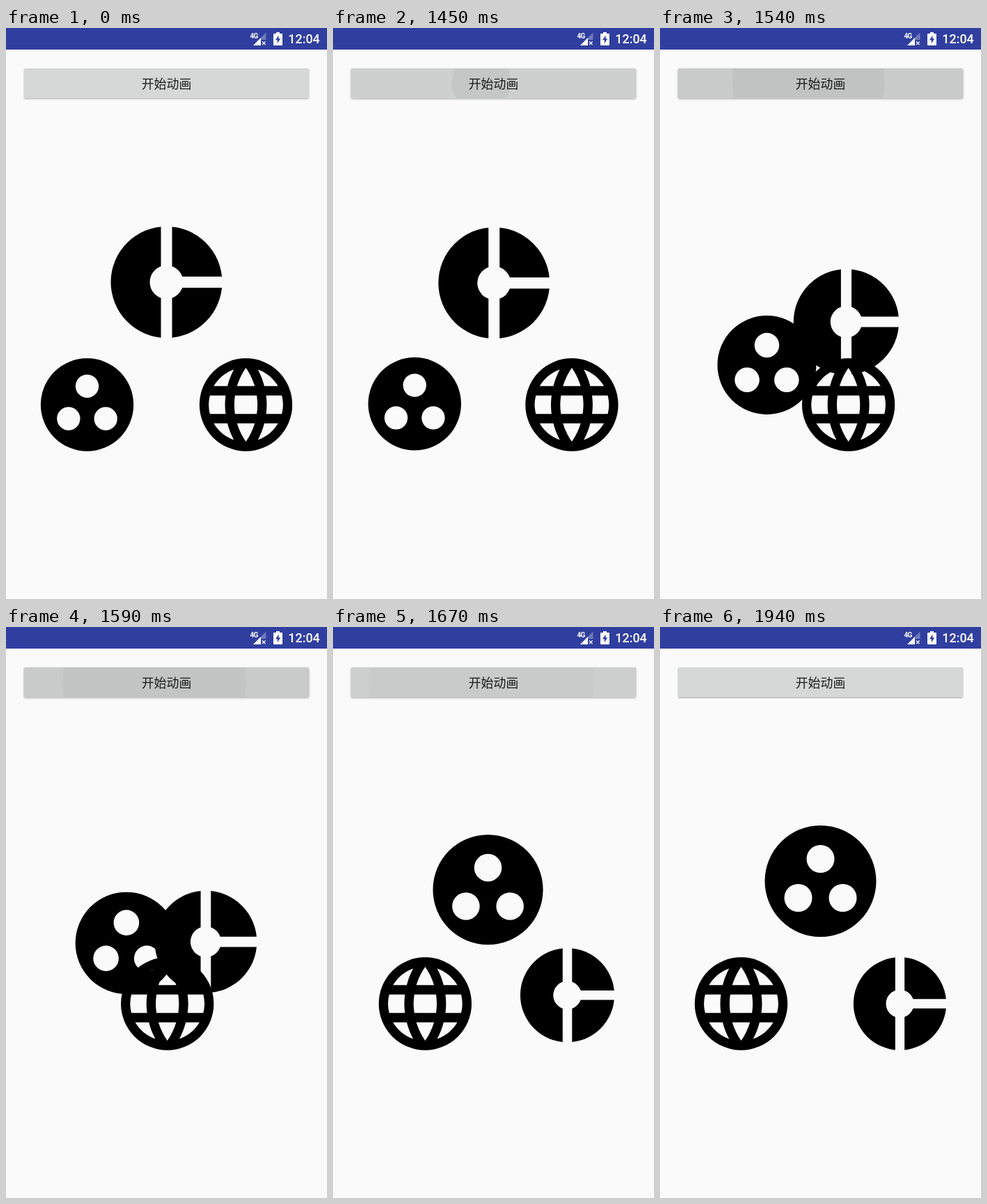
An HTML page that plays this animation: 461 by 820 pixels, repeating every 4.9 s.

```html
<!DOCTYPE html>
<html lang="zh">
<head>
<meta charset="utf-8">
<title>开始动画</title>
<style>
  html, body { margin: 0; width: 100%; height: 100%; overflow: hidden; background: #fafafa; }
  svg { position: absolute; left: 0; top: 0; width: 100%; height: 100%; }
  #shadow { position: absolute; left: 25.6px; top: 58px; width: 409.8px; height: 43px; border-radius: 2.6px; }
  .clock { font: 500 17.9px Roboto, sans-serif; }
  .network { font: 700 10px Roboto, sans-serif; letter-spacing: -.7px; }
  .label { font: 400 17.9px "Noto Sans CJK SC", "Noto Sans CJK", sans-serif; }
</style>
</head>
<body>
<div id="shadow"></div>
<svg viewBox="0 0 461 820">
  <defs>
    <clipPath id="buttonClip"><rect x="25.6" y="58" width="409.8" height="43" rx="2.6"/></clipPath>
    <path id="corner" d="M6.92-4H3.97C3.65-5.25 3.19-6.45 2.59-7.56 4.43-6.93 5.96-5.65 6.92-4Z"/>
    <path id="cap" d="M0-7.96C.83-6.76 1.48-5.43 1.91-4H-1.91C-1.48-5.43-.83-6.76 0-7.96Z"/>
    <g id="side">
      <use href="#corner"/>
      <use href="#corner" transform="scale(1 -1)"/>
      <path d="M4.36 2C4.44 1.34 4.5.68 4.5 0S4.44-1.34 4.36-2H7.74C7.9-1.36 8-.69 8 0S7.9 1.36 7.74 2Z"/>
    </g>
    <mask id="globeMask" maskUnits="userSpaceOnUse" x="-11" y="-11" width="22" height="22">
      <rect x="-11" y="-11" width="22" height="22" fill="#fff"/>
      <use href="#side"/>
      <use href="#side" transform="scale(-1 1)"/>
      <use href="#cap"/>
      <use href="#cap" transform="scale(1 -1)"/>
      <path d="M2.34 2H-2.34C-2.43 1.34-2.5.68-2.5 0S-2.43-1.35-2.34-2H2.34C2.43-1.35 2.5-.68 2.5 0S2.43 1.34 2.34 2Z"/>
    </mask>
    <mask id="dotsMask" maskUnits="userSpaceOnUse" x="-11" y="-11" width="22" height="22">
      <rect x="-11" y="-11" width="22" height="22" fill="#fff"/>
      <circle cy="-4" r="2.5"/>
      <circle cx="-4" cy="3" r="2.5"/>
      <circle cx="4" cy="3" r="2.5"/>
    </mask>
    <mask id="donutMask" maskUnits="userSpaceOnUse" x="-11" y="-11" width="22" height="22">
      <rect x="-11" y="-11" width="22" height="22" fill="#fff"/>
      <circle r="3"/>
      <path d="M-1-11H1V-1H11V1H1V11H-1Z"/>
    </mask>
  </defs>

  <!-- status bar -->
  <rect width="461" height="31" fill="#303f9f"/>
  <g fill="#fff">
    <text class="network" x="350.5" y="15">4G</text>
    <path d="M355 25L366 14V25Z"/>
    <path d="M366 14L373.5 6.5V17H366Z" opacity=".3"/>
    <path d="M368 19.5l4.6 4.6m0-4.6l-4.6 4.6" stroke="#fff" stroke-width="1.3"/>
    <path d="M388 6h5v2h3q1 0 1 1v15q0 1-1 1h-11q-1 0-1-1v-15q0-1 1-1h3z"/>
    <path d="M391.5 10.5L387 17.3h2.8v5l4.4-7h-2.7z" fill="#303f9f"/>
    <text class="clock" x="405.3" y="22.4">12:04</text>
  </g>

  <!-- button -->
  <g clip-path="url(#buttonClip)">
    <rect x="25" y="57" width="411" height="45" fill="#d6d7d7"/>
    <rect id="press" x="25" y="57" width="411" height="45"/>
    <circle id="ripple" cx="213" cy="78"/>
  </g>
  <text class="label" x="230.5" y="87.2" text-anchor="middle" fill-opacity=".87">开始动画</text>

  <!-- icons, drawn around 0,0 with radius 10 -->
  <g id="donut"><circle r="10" mask="url(#donutMask)"/></g>
  <g id="dots"><circle r="10" mask="url(#dotsMask)"/></g>
  <g id="globe"><circle r="10" mask="url(#globeMask)"/></g>
</svg>
<script>
  const LOOP = 4900;
  const PRESS = 1330, RIPPLE = 1405, MOVE = 1424, RELEASED = 1890;
  const MOVE_TIME = 300;
  const RECORD_STEP = 45;
  const SCREEN_STEP = 1000 / 60; // the icons move on the phone's refresh ticks

  const byId = id => document.getElementById(id);
  const [donut, dots, globe, press, ripple, shadow] =
    ['donut', 'dots', 'globe', 'press', 'ripple', 'shadow'].map(byId);

  const upper = { x: 230.5, y: 365, scale: 8 };
  const left = { x: 116.5, y: 541, scale: 20 / 3 };
  const right = { x: 344.5, y: 541, scale: 20 / 3 };

  const clamp = v => Math.min(1, Math.max(0, v));
  const mix = (a, b, k) => a + (b - a) * k;
  const ease = u => (1 - Math.cos(Math.PI * u)) / 2;

  function place(icon, from, to, k) {
    const [x, y, scale] = ['x', 'y', 'scale'].map(key => mix(from[key], to[key], k));
    icon.setAttribute('transform', `translate(${x} ${y}) scale(${scale})`);
  }

  function render(time) {
    const t = PRESS + Math.floor((time - PRESS + 20) / RECORD_STEP) * RECORD_STEP - 20;

    const moved = Math.round((t - MOVE) / SCREEN_STEP) * SCREEN_STEP - 1;
    const k = ease(clamp(moved / MOVE_TIME));
    place(donut, upper, right, k);
    place(globe, right, left, k);
    place(dots, left, upper, k);

    const spread = 1 - Math.exp(-Math.max(0, t - RIPPLE) / 172);
    ripple.setAttribute('r', 206 * spread);
    ripple.setAttribute('fill-opacity', .045 * clamp((1790 - t) / 300));

    const held = clamp(Math.min((t - PRESS) / 180, (RELEASED - t) / 310));
    press.setAttribute('fill-opacity', .063 * held);

    const lift = clamp(Math.min((time - PRESS) / 20 + .5, (RELEASED - time) / 250));
    shadow.style.boxShadow = `0 1px ${mix(1.8, 3, time < PRESS ? 0 : lift)}px rgba(0,0,0,.32)`;
  }

  const start = performance.now();
  function tick() {
    render((performance.now() - start) % LOOP);
    requestAnimationFrame(tick);
  }
  tick();
</script>
</body>
</html>
```
